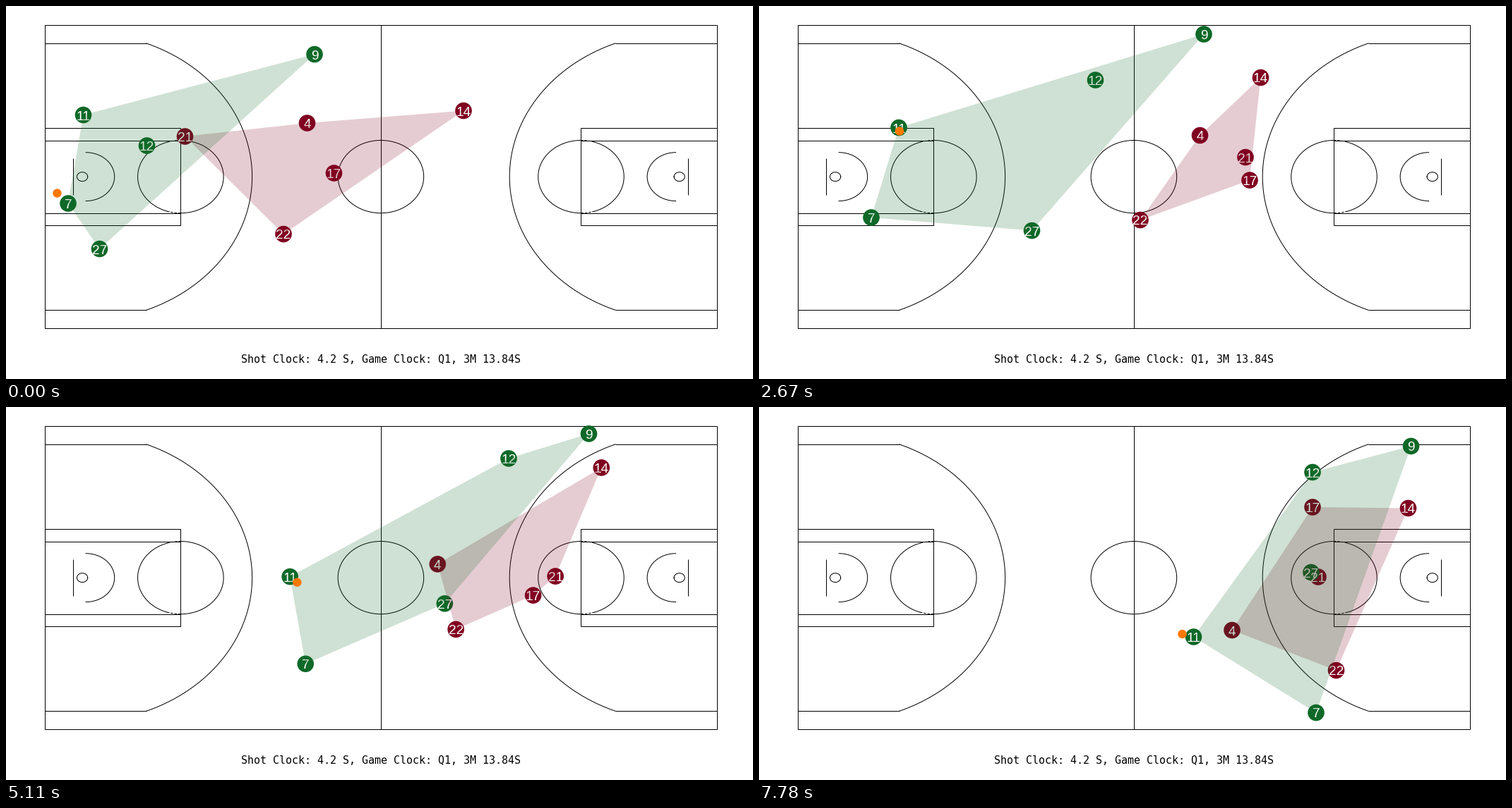
A matplotlib script for the animation above (8000 ms loop, 1058 by 529 pixels).

```python
import numpy as np
import matplotlib.pyplot as plt
from matplotlib.animation import FuncAnimation
from matplotlib.patches import Arc, Circle, Ellipse, Polygon, Rectangle

W, H, DPI = 1058, 529, 128   # a power-of-two dpi keeps the pixel size exact
PX = 72 / DPI                # points per pixel
FRAMES, LOOP_MS = 36, 8000

GREEN, RED, ORANGE = "#0f6928", "#800020", "#ff7800"

# Court geometry: feet to pixels
X0, Y0 = 54.9, 27.1
FX, FY = 952 / 94, 430 / 50
MID = Y0 + 25 * FY

# Player positions at the key steps
KEYS = [0, 7, 12, 16, 23, 28, 35]
HOME = {
    "9": [(437, 68.5), (530.5, 42), (630, 40), (714.5, 37.5), (841, 38.5), (899.5, 43), (923.5, 55.5)],
    "11": [(109.5, 154.5), (130.5, 160), (198, 172.5), (270, 198.5), (425.5, 250), (532, 303), (615.5, 326)],
    "12": [(199.5, 198), (334.5, 137), (476.5, 105), (591, 89), (724, 72), (755.5, 76), (784, 92.5)],
    "7": [(88, 280), (73, 285), (159, 300), (257, 320), (454, 372.5), (604.5, 409.5), (789, 433.5)],
    "27": [(132.5, 344.5), (259, 334), (386.5, 318.5), (493, 306), (640, 272.5), (722.5, 240.5), (782, 234.5)],
}
AWAY = {
    "4": [(426.5, 166), (588, 185), (624.5, 183.5), (625.5, 194), (612, 231.5), (636, 286), (670, 316.5)],
    "14": [(648, 148.5), (709, 133.5), (710.5, 101.5), (755, 88.5), (856.5, 88.5), (904.5, 112.5), (919.5, 143.5)],
    "17": [(464.5, 237), (619.5, 254.5), (695, 247), (729, 254), (747.5, 260), (753.5, 185), (784, 142)],
    "21": [(253.5, 185), (526, 209), (689, 214.5), (761, 225), (776.5, 242), (773, 248), (792, 241)],
    "22": [(393, 323.5), (487.5, 308), (540, 303.5), (577.5, 304.5), (648.5, 319), (713, 343.5), (817.5, 373.5)],
}
# Additional steps where a run turns sharply
TURNS = {"7": (4, 53.5, 284), "14": (5, 709.5, 139), "27": (2, 144, 347)}


def spline(knots, values, at):
    """Natural cubic spline through the knots."""
    t, v = np.asarray(knots, float), np.asarray(values, float)
    h, slope = np.diff(t), np.diff(v) / np.diff(t)
    n = len(t)
    a, b = np.eye(n), np.zeros(n)
    for i in range(1, n - 1):
        a[i, i - 1:i + 2] = h[i - 1], 2 * (h[i - 1] + h[i]), h[i]
        b[i] = 6 * (slope[i] - slope[i - 1])
    m = np.linalg.solve(a, b)
    i = np.clip(np.searchsorted(t, at, side="right") - 1, 0, n - 2)
    d = at - t[i]
    start = slope[i] - h[i] * (2 * m[i] + m[i + 1]) / 6
    return v[i] + d * start + d**2 * m[i] / 2 + d**3 * (m[i + 1] - m[i]) / (6 * h[i])


STEPS = np.arange(FRAMES)


def track(name, points):
    rows = [(k, x, y) for k, (x, y) in zip(KEYS, points)]
    if name in TURNS:
        rows = sorted(rows + [TURNS[name]])
    k, x, y = zip(*rows)
    return np.column_stack([spline(k, x, STEPS), spline(k, y, STEPS)])


def ball_track(carrier):
    """Inbound pass first, then a dribble beside the carrier."""
    start = [0, 2, 4, 5, 6, 7]
    inbound = np.column_stack([
        np.interp(STEPS, start, [72.5, 66, 59, 64, 100, 138]),
        np.interp(STEPS, start, [265.5, 272, 278, 272, 216, 160])])
    dribble = carrier + np.column_stack([
        np.interp(STEPS, KEYS[1:], [7.5, 1, -12.5, 14, -6, -16]),
        np.interp(STEPS, KEYS[1:], [0, 5, 5.5, 8.5, 7.5, -4])])
    return np.where((STEPS < 7)[:, None], inbound, dribble)


def hull(points):
    """Convex hull by monotone chain."""
    pts = sorted(map(tuple, points))

    def chain(seq):
        out = []
        for p in seq:
            while len(out) > 1:
                (ax_, ay), (bx, by) = out[-2:]
                if (bx - ax_) * (p[1] - ay) - (by - ay) * (p[0] - ax_) > 0:
                    break
                out.pop()
            out.append(p)
        return out[:-1]

    return chain(pts) + chain(pts[::-1])


fig = plt.figure(figsize=(W / DPI, H / DPI), dpi=DPI, facecolor="white")
ax = fig.add_axes([0, 0, 1, 1])
ax.set_xlim(0, W)
ax.set_ylim(H, 0)
ax.axis("off")

PEN = dict(color="black", lw=PX, zorder=1)
SHAPE = dict(fill=False, ec="black", lw=PX, zorder=1)


def line(xs, ys):
    ax.plot(xs, ys, solid_capstyle="butt", **PEN)


def curve(cx, rx_ft, ry_ft, a0, a1, **style):
    a = np.radians(np.linspace(a0, a1, 120))
    ax.plot(cx + rx_ft * FX * np.cos(a), MID + ry_ft * FY * np.sin(a), **PEN, **style)


def draw_half(side):
    """side 0 is the left half, side 1 its mirror."""
    def x(ft):
        return X0 + (94 - ft if side else ft) * FX

    def arc(ft, r, a0, a1, **style):
        if side:
            a0, a1 = 180 - a0, 180 - a1
        curve(x(ft), r, r, a0, a1, **style)

    for half in (8, 6):
        ys = MID - half * FY, MID + half * FY
        line([x(0), x(19), x(19), x(0), x(0)], [ys[0], ys[0], ys[1], ys[1], ys[0]])
    arc(19, 6, -90, 90)
    arc(19, 6, 108, 252)
    for a0 in (90, 252):
        arc(19, 6, a0, a0 + 18, dashes=(3.7, 1.6))
    arc(5.75, 4, -90, 90)
    arc(5.25, 0.75, 0, 360)
    line([x(4)] * 2, [MID - 3 * FY, MID + 3 * FY])

    reach = np.degrees(np.arcsin(22 / 23.75))
    corner = 5.25 + np.sqrt(23.75**2 - 22**2)
    arc(5.25, 23.75, -reach, reach)
    for sign in (-1, 1):
        line([x(0), x(corner)], [MID + sign * 22 * FY] * 2)


ax.add_patch(Rectangle((X0, Y0), 94 * FX, 50 * FY, **SHAPE))
line([X0 + 47 * FX] * 2, [Y0, Y0 + 50 * FY])
ax.add_patch(Ellipse((X0 + 47 * FX, MID), 12 * FX, 12 * FY, **SHAPE))
draw_half(0)
draw_half(1)

ax.text(531, 505.5, "Shot Clock: 4.2 S, Game Clock: Q1, 3M 13.84S",
        family="DejaVu Sans Mono", size=15 * PX, ha="center", va="baseline")


class Team:
    def __init__(self, roster, color, z):
        self.paths = {n: track(n, p) for n, p in roster.items()}
        self.dots, self.labels = {}, {}
        for n in roster:
            self.dots[n] = ax.add_patch(Circle((0, 0), 11.8, fc=color, lw=0, zorder=z))
            self.labels[n] = ax.text(0, 0, n, family="Liberation Sans", size=19 * PX,
                                     color="white", ha="center", va="baseline", zorder=4)
        self.area = ax.add_patch(Polygon([(0, 0), (1, 0), (0, 1)], fc=color,
                                         alpha=0.2, lw=0, zorder=z + 3))

    def move(self, step):
        spots = []
        for n, path in self.paths.items():
            x, y = path[step]
            self.dots[n].center = x, y
            self.labels[n].set_position((x, y + 7))
            spots.append((x, y))
        self.area.set_xy(hull(spots))


away = Team(AWAY, RED, 2)
home = Team(HOME, GREEN, 3)
ball_path = ball_track(home.paths["11"])
ball = ax.add_patch(Circle((0, 0), 6.2, fc=ORANGE, lw=0, zorder=7))


def update(step):
    home.move(step)
    away.move(step)
    ball.center = tuple(ball_path[step])
    return []


anim = FuncAnimation(fig, update, frames=FRAMES, interval=LOOP_MS / FRAMES,
                     repeat=True, repeat_delay=0, blit=False)
plt.show()
```
